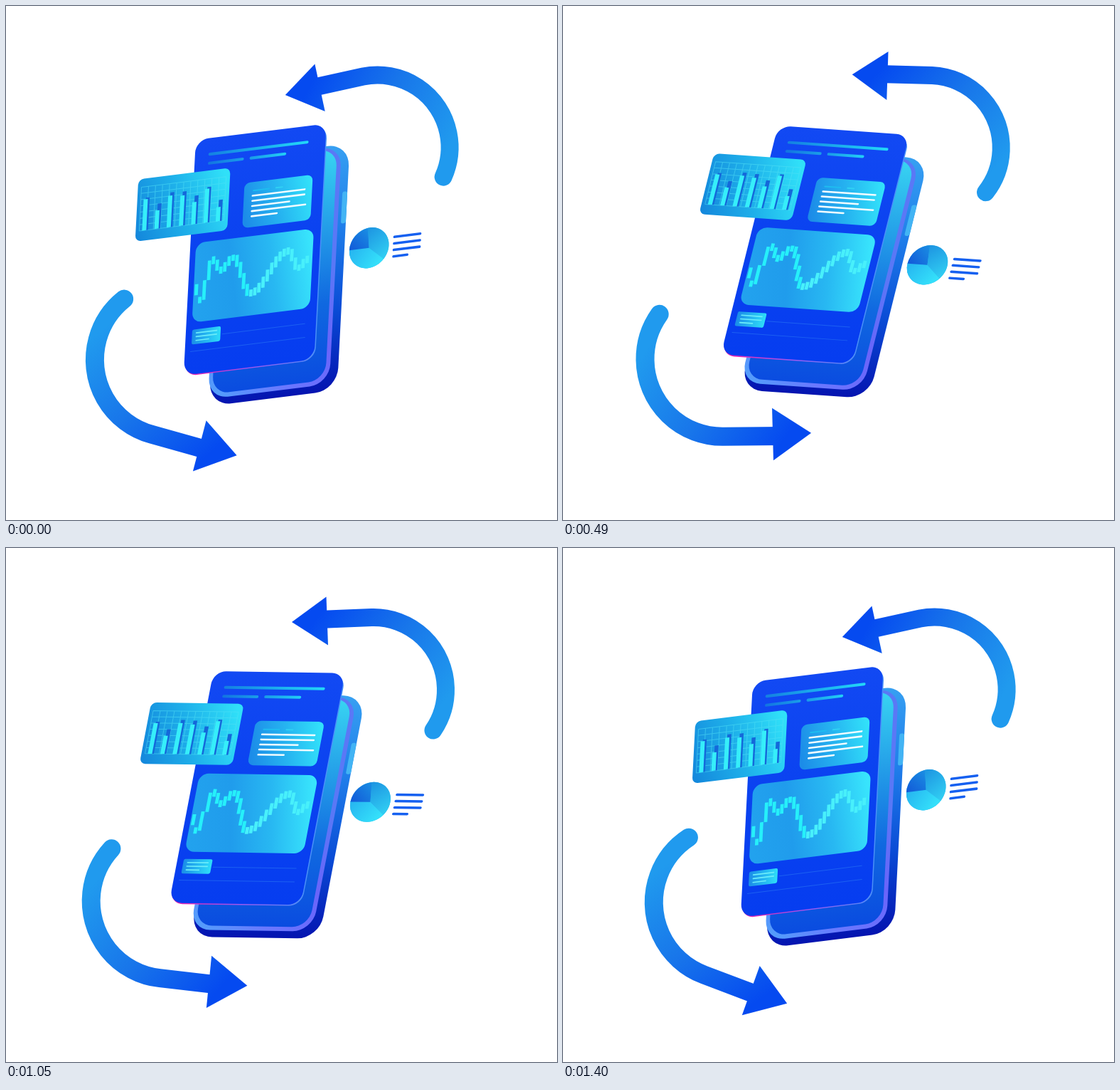
An HTML page with a canvas for the animation above (1470 ms loop, 775x722 px).

```html
<!DOCTYPE html>
<html>
<head>
<meta charset="utf-8">
<style>
html, body { margin: 0; width: 100%; height: 100%; overflow: hidden; background: #fff; }
canvas { display: block; }
</style>
</head>
<body>
<canvas id="stage" width="775" height="722"></canvas>
<script>
const ctx = document.getElementById('stage').getContext('2d');
const STEP = 70, STEPS = 21, DEG = Math.PI / 180;

// turning points of the price curve: candle index, height on the card
const turns = [[0, 209], [1, 224], [4, 171], [6, 186], [9, 171], [14, 223], [23, 171], [26, 196], [28, 186]];

function price(i) {
  const n = Math.max(1, turns.findIndex(([at]) => at >= i));
  const [[i0, p0], [i1, p1]] = turns.slice(n - 1, n + 1);
  return p0 + (p1 - p0) * (1 - Math.cos(Math.PI * (i - i0) / (i1 - i0))) / 2;
}

function gradient(x0, y0, x1, y1, ...colors) {
  const g = ctx.createLinearGradient(x0, y0, x1, y1);
  colors.forEach((c, i) => g.addColorStop(i / (colors.length - 1), c));
  return g;
}

function box(x0, y0, x1, y1, r, fill) {
  ctx.fillStyle = fill;
  ctx.beginPath();
  ctx.roundRect(x0, y0, x1 - x0, y1 - y0, r);
  ctx.fill();
}

function line(x0, x1, y, width, color) {
  box(x0 - width / 2, y - width / 2, x1 + width / 2, y + width / 2, width / 2, color);
}

function spin(x, y, degrees, draw) {
  ctx.save();
  ctx.translate(x, y);
  ctx.rotate(degrees * DEG);
  ctx.translate(-x, -y);
  draw();
  ctx.restore();
}

function arrow(head, start, cx, cy, r, from, to, width, paint) {
  ctx.strokeStyle = ctx.fillStyle = paint;
  ctx.lineWidth = width;
  ctx.lineCap = 'round';
  ctx.beginPath();
  ctx.moveTo(...start);
  ctx.arc(cx, cy, r, from * DEG, to * DEG);
  ctx.stroke();
  ctx.beginPath();
  head.forEach(p => ctx.lineTo(...p));
  ctx.fill();
}

function upperArrow() {
  arrow([[402, 104], [450.5, 68.5], [453, 136.5]], [440, 100.6], 517, 199, 101.5, -91.5, 34.2, 25,
    gradient(610, 225, 440, 95, '#209aee', '#1876ea', '#054af0'));
}

function lowerArrow() {
  arrow([[343, 609.5], [291, 570], [287, 643.5]], [302, 610.4], 227, 496, 108.8, 93.8, 220.1, 26,
    gradient(125, 470, 305, 615, '#209aee', '#1876ea', '#054af0'));
}

function body() {
  box(38.5, 32, 220, 373, 31, gradient(0, 32, 0, 373, '#37a0f2', '#1f7eea', '#0a4cd6', '#0414b0'));
  box(213, 98, 220, 142, 3, '#42b4f4');
  box(36.5, 34, 208.5, 363, 28, gradient(36, 363, 207, 200, '#4fa4fa', '#6a78ff', '#6a64fa', '#5a78f6'));
  box(42, 37, 202.5, 357, 24, gradient(0, 37, 0, 357, '#38d4f2', '#249ee8', '#1068e0', '#0a4ce0'));
}

function panel() {
  box(1, 3, 186.5, 327.5, 18, gradient(10, 327, 186, 300, '#f020b0', '#a058f0', '#4a90f8'));
  box(0, .5, 185, 326, 18, gradient(0, 0, 0, 326, '#1249f3', '#0a42f0', '#063df0'));
  line(21, 159, 22.9, 4, gradient(20, 0, 160, 0, '#1480e2', '#22d8f8'));
  line(21, 68, 35.4, 4, gradient(20, 0, 70, 0, '#1274e2', '#1a9ee8'));
  line(80, 128, 35.4, 4, gradient(78, 0, 130, 0, '#1a9ae8', '#22d0f6'));
  line(52, 169, 275, 1, '#1c60f2');
  line(8, 170, 294, 1, '#1c60f2');
}

function textCard() {
  box(72.7, 69, 169.5, 131.5, 8, gradient(73, 110, 170, 85, '#1c8ce8', '#26b4f0', '#32e2fa'));
  line(86, 108, 81, 2, '#1fbcf0');
  line(118, 127, 81, 2, '#30d0f4');
  [159, 159, 138, 161, 121].forEach((end, i) => line(85, end, 88 + 7.1 * i, 2.5, '#f0fcff'));
}

function candleCard() {
  box(8, 144, 175, 254, 13, gradient(8, 215, 175, 185, '#22a2ee', '#209cec', '#28b8f2', '#38e4fc'));
  for (let i = 0; i <= 28; i++) {
    const u = 9.5 + 5.565 * i, mid = price(i);
    const half = 4 + .24 * Math.abs(price(Math.min(i + 1, 28)) - price(Math.max(i - 1, 0)));
    box(u, mid - half, u + 4.8, mid + half, 0, i < 14 ? '#26f0fa' : '#48f0fb');
  }
}

function noteCard() {
  box(9, 264, 49.5, 284.5, 2.5, gradient(9, 0, 49, 0, '#1a8ce8', '#2edcf8'));
  [44, 44, 33].forEach((end, i) => line(15, end, 269 + 5.2 * i, 1.6, '#6cecfa'));
}

function barCard() {
  box(-79, 45.5, 51.5, 131.7, 8, gradient(-79, 120, 51, 70, '#1488dc', '#1eb0ea', '#30e0f8'));
  ctx.strokeStyle = 'rgba(80, 225, 245, .55)';
  ctx.lineWidth = 1;
  ctx.beginPath();
  for (let u = -74; u <= 46; u += 10) { ctx.moveTo(u, 57); ctx.lineTo(u, 117.5); }
  for (let i = 0; i < 8; i++) { ctx.moveTo(-74, 57 + 8.64 * i); ctx.lineTo(46, 57 + 8.64 * i); }
  ctx.stroke();
  for (let i = 0; i < 7; i++) {
    const u = -70 + 17.4 * i, wave = Math.cos(i * 147 * DEG), hump = 9 * Math.sin(i * 30 * DEG);
    box(u + 3, 80.5 - 8 * wave - hump, u + 8.5, 117.5, 0, '#1468da');
    box(u, 86.5 - 12 * wave - hump, u + 6, 117.5, 0, '#36eefa');
  }
}

function pie() {
  const x = 255.1, y = 180.5, r = 28;
  const slice = (from, to, fill) => {
    ctx.fillStyle = fill;
    ctx.beginPath();
    ctx.moveTo(x, y);
    ctx.arc(x, y, r, from * DEG, to * DEG);
    ctx.fill();
  };
  slice(0, 360, '#26b4ee');
  slice(38, 182, gradient(x - r, y, x + 10, y + r, '#26b4f0', '#34e0fa'));
  slice(180, 264, gradient(x - r, y, x, y - r, '#1258d8', '#1a92e4'));
  slice(263, 400, gradient(x, y - r, x + r, y + 10, '#1e96e2', '#30ccf2'));
  [327, 327, 327, 310].forEach((end, i) => line(290.5, end, 169.6 + 9 * i, 3.5, '#1560f0'));
}

function phone() {
  ctx.transform(1, .015, -.192, 1, 292, 172.5);
  [body, panel, textCard, candleCard, noteCard, barCard, pie].forEach(draw => draw());
}

function render() {
  const step = Math.floor(performance.now() / STEP) % STEPS;
  const swing = 1 - Math.abs(step - 10) / 10;
  const lower = step < 10 ? 11.55 - 2.31 * step : -11.55 + 2.82 * (step - 10);
  ctx.clearRect(0, 0, 775, 722);
  spin(517, 167, 20 * swing - 10, upperArrow);
  spin(226, 529.5, lower, lowerArrow);
  spin(387.5, 361, 15.8 * (swing - .5), phone);
  requestAnimationFrame(render);
}
render();
</script>
</body>
</html>
```
